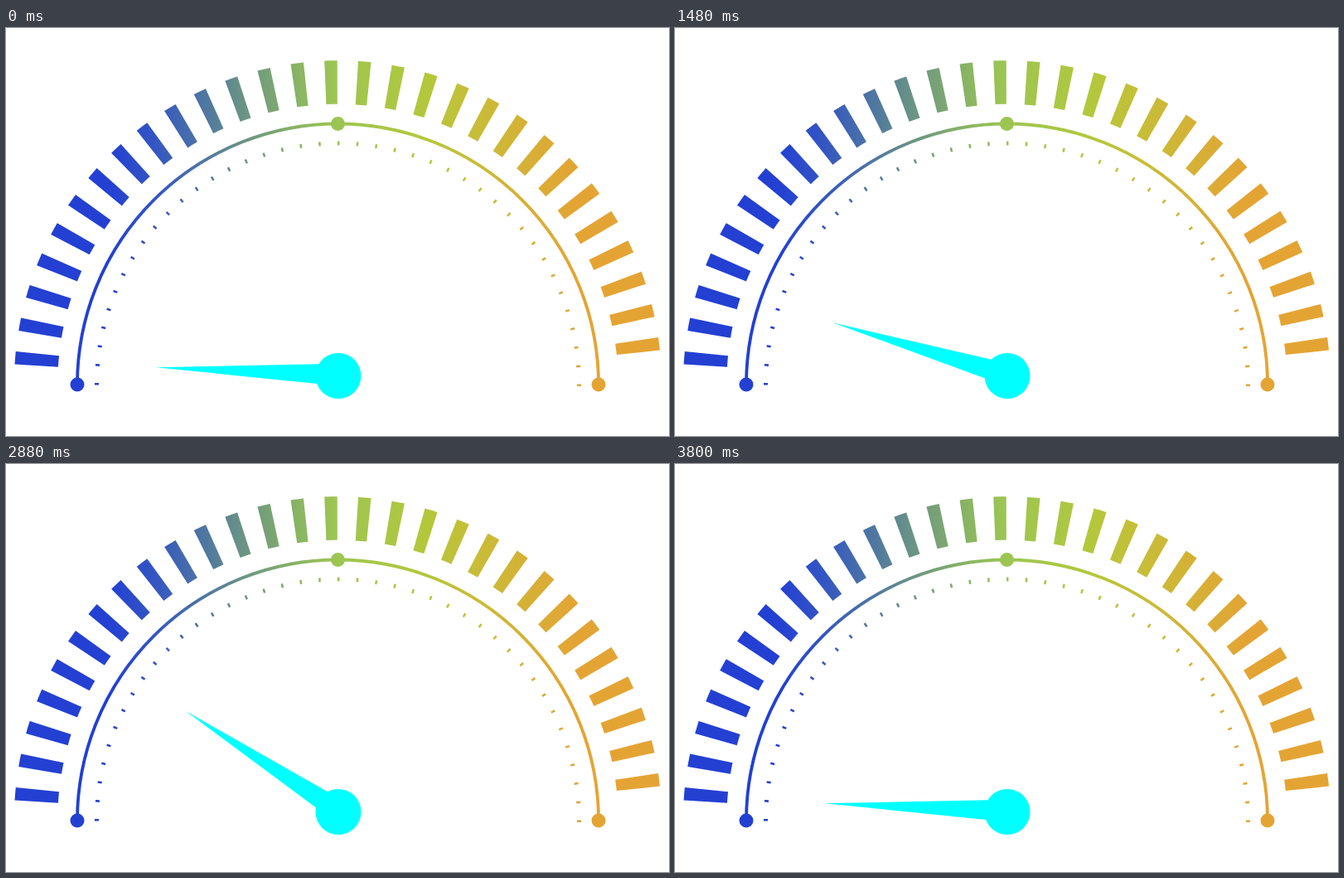
Recreate the animation shown at these times as an HTML page. Size 800 by 492 pixels, loop 3840 ms.

```html
<!DOCTYPE html>
<html lang="en">
<head>
<meta charset="utf-8">
<title>Gauge</title>
<style>
  html, body { margin: 0; width: 100%; height: 100%; overflow: hidden; background: #fff; }
  svg { display: block; width: 100vw; height: 100vh; }
</style>
</head>
<body>
<svg viewBox="0 0 800 492">
  <defs>
    <linearGradient id="scale" gradientUnits="userSpaceOnUse" x1="0" y1="0" x2="800" y2="0"></linearGradient>
  </defs>
  <g id="dial" fill="none" stroke="url(#scale)"></g>
  <g id="ends" fill="url(#scale)"></g>
  <g fill="#0ff">
    <path id="needle" d="M-220.5 0L0 -14.8V11.9Z"/>
    <circle cx="401" cy="419.5" r="27.5"/>
  </g>
</svg>
<script>
const LOOP = 3840, TICK = 40, SWING = 960;
const CX = 400.5, CY = 430;
const LOW = 2.65, HIGH = 33.45;
const $ = id => document.getElementById(id);

function add(parent, tag, attrs) {
  const el = document.createElementNS('http://www.w3.org/2000/svg', tag);
  for (const key in attrs) el.setAttribute(key, attrs[key]);
  parent.append(el);
}

// Angles run clockwise in degrees, 0 at the left end of the dial.
function point(r, deg) {
  const a = deg * Math.PI / 180;
  return [CX - r * Math.cos(a), CY - r * Math.sin(a)];
}

function arc(r, from, to, width, dash) {
  const large = to - from > 180 ? 1 : 0;
  add($('dial'), 'path', {
    d: `M${point(r, from)}A${r} ${r} 0 ${large} 1 ${point(r, to)}`,
    'stroke-width': width,
    pathLength: to - from,
    ...(dash && { 'stroke-dasharray': dash })
  });
}

const stops = [
  [125, '#2340d3'], [180, '#3456c2'], [245, '#517a9e'], [280, '#679088'],
  [354, '#8ab563'], [395, '#9bc553'], [500, '#b2c83c'], [560, '#c6be38'],
  [690, '#e4a434']
];
for (const [x, color] of stops) add($('scale'), 'stop', { offset: x / 800, 'stop-color': color });

arc(364.5, 3.6, 174.2, 52.5, '2.3 3.7');
arc(314.5, 0, 180, 3.8);
arc(291, -0.1, 180.4, 5, '0.5 4');
for (const deg of [0, 90, 180]) {
  const [cx, cy] = point(314.5, deg);
  add($('ends'), 'circle', { cx, cy, r: 8.5 });
}

function bezier(x1, y1, x2, y2) {
  const at = (a, b, s) => 3 * a * s * (1 - s) ** 2 + 3 * b * s * s * (1 - s) + s ** 3;
  return p => {
    if (p <= 0 || p >= 1) return p <= 0 ? 0 : 1;
    let lo = 0, hi = 1;
    for (let i = 0; i < 30; i++) {
      const mid = (lo + hi) / 2;
      if (at(x1, x2, mid) < p) lo = mid; else hi = mid;
    }
    return at(y1, y2, lo);
  };
}
const rise = bezier(0.333, 0, 0.833, 0.833);
const fall = bezier(0.95, 0, 0.833, 0.833);

function draw(ms) {
  const t = Math.floor((ms % LOOP) / TICK) * TICK + TICK;
  const turn = rise((t - 960) / SWING) - fall((t - 2880) / SWING);
  const deg = LOW + (HIGH - LOW) * turn;
  $('needle').setAttribute('transform', `translate(401 419.5) rotate(${deg})`);
}

const start = performance.now();
function frame() {
  draw(performance.now() - start);
  requestAnimationFrame(frame);
}
frame();
</script>
</body>
</html>
```
